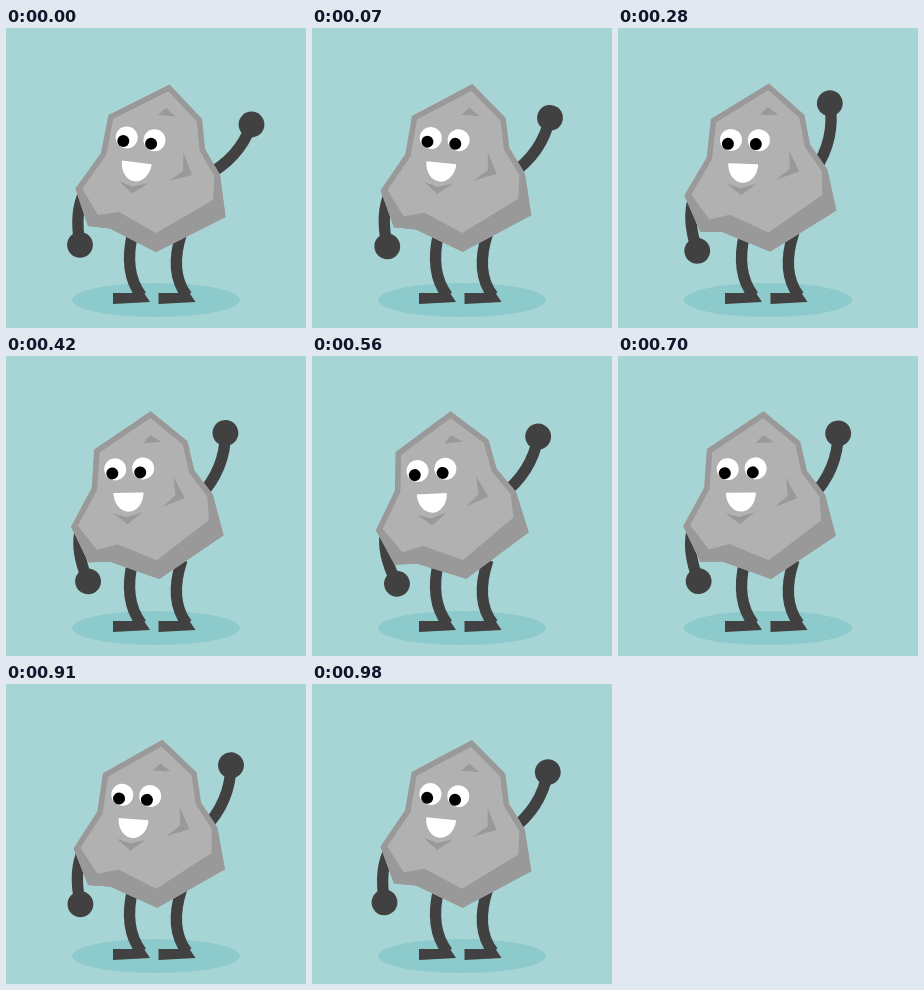
Animation of 300x300 px, one loop 1050 ms. Source, as an HTML page with a canvas:

```html
<!DOCTYPE html>
<html lang="en">
<head>
<meta charset="utf-8">
<title>Waving rock</title>
<style>
  html, body { margin: 0; width: 100%; height: 100%; overflow: hidden; background: #a7d4d4; }
  canvas { display: block; width: 100vw; height: 100vh; }
</style>
</head>
<body>
<canvas id="stage"></canvas>
<script>
const canvas = document.getElementById('stage');
const ctx = canvas.getContext('2d');
const STEP = 70, STEPS = 15;
const LIMB = '#414141', DARK = '#999', LIGHT = '#b1b1b1';

// Linear rise from a to a peak of 1 at p, then fall to b
const tent = (s, a, p, b) => Math.max(0, Math.min((s - a) / (p - a), (b - s) / (b - p)));

const sway = s => -10 * tent(s, 0, 8, 15);
const wave = s => -24.2 * (tent(s, 0, 4, 8) + tent(s, 8, 12, 15));
const swing = s => 2.1 * tent(s, 12.6, 14, 15) - 7.3 * tent(s, 0, 8, 12.6);

function rotated(x, y, deg, draw) {
  ctx.save();
  ctx.translate(x, y);
  ctx.rotate(deg * Math.PI / 180);
  ctx.translate(-x, -y);
  draw();
  ctx.restore();
}

function fill(color, svgPath) {
  const path = new Path2D(svgPath);
  ctx.fillStyle = color;
  ctx.fill(path);
  return path;
}

function oval(color, x, y, rx, ry = rx, tilt = 0, end = Math.PI * 2) {
  ctx.fillStyle = color;
  ctx.beginPath();
  ctx.ellipse(x, y, rx, ry, tilt, 0, end);
  ctx.fill();
}

function limb(x0, y0, cx, cy, x1, y1) {
  ctx.strokeStyle = LIMB;
  ctx.lineWidth = 11.3;
  ctx.beginPath();
  ctx.moveTo(x0, y0);
  ctx.quadraticCurveTo(cx, cy, x1, y1);
  ctx.stroke();
}

function leg(x, hip) {
  limb(hip, 204, x + 10, 244, x + 28.5, 268);
  fill(LIMB, `M${x} 265h31l6 9-37 2z`);
}

function arm(x0, y0, cx, cy, x1, y1) {
  limb(x0, y0, cx, cy, x1, y1);
  oval(LIMB, x1, y1, 12.9);
}

function eye(x, y) {
  oval('#fff', x, y, 11);
  oval('#000', x - 3.4, y + 3.6, 6);
}

function rock() {
  const outline = fill(LIGHT, `M163.5 56.5 196 91 199 121 214 147 219.5 189 150 224
    104 200.5 82 198 69.5 160.5 95 125 102.5 87z`);
  // Dark rim and underside, kept inside the outline
  ctx.save();
  ctx.clip(outline);
  ctx.strokeStyle = DARK;
  ctx.lineWidth = 11;
  ctx.stroke(outline);
  fill(DARK, 'M76 160 92 187 113 184 150 205 207 172 208.5 148H230V230H60V160z');
  ctx.restore();

  fill(DARK, 'M152 87 160 80 170 88.5z');
  fill(DARK, 'M177.5 125 186 147 162.5 153 177 143z');
  fill(DARK, 'M113 153 126 158.5 142 155.5 126 165.5z');
}

function face() {
  eye(120.7, 109.5);
  eye(148.5, 112.2);
  oval('#fff', 130.8, 134.4, 15, 19, 0.12, Math.PI);
}

function draw(s) {
  ctx.fillStyle = '#a7d4d4';
  ctx.fillRect(0, 0, 300, 300);
  oval('#8dcacb', 150, 272, 84, 17);
  leg(107, 127);
  leg(152.5, 176);
  rotated(144.5, 199, sway(s), () => {
    rotated(199, 143, wave(s), () => arm(199, 148, 233, 131, 245.5, 96.5));
    rotated(79, 163, swing(s), () => arm(79, 163, 68, 183, 74, 216.8));
    rock();
    face();
  });
}

function tick() {
  const w = Math.round(innerWidth * devicePixelRatio);
  const h = Math.round(innerHeight * devicePixelRatio);
  if (canvas.width !== w || canvas.height !== h) {
    canvas.width = w;
    canvas.height = h;
  }
  ctx.setTransform(w / 300, 0, 0, h / 300, 0, 0);
  draw(Math.floor((performance.now() - start) / STEP) % STEPS);
  requestAnimationFrame(tick);
}

const start = performance.now();
tick();
</script>
</body>
</html>
```
